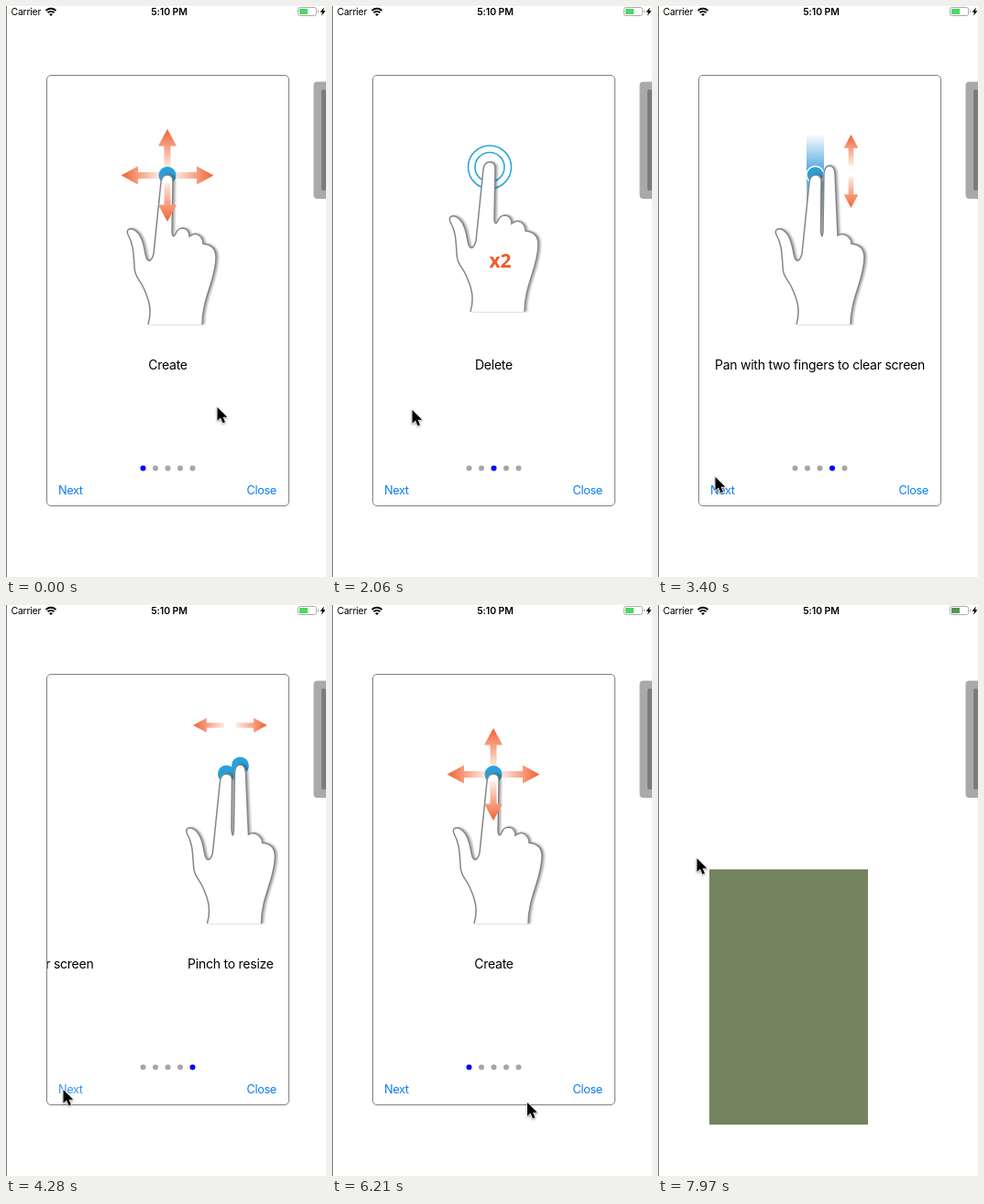
An HTML page that plays this animation: 349 px wide and 622 px high, repeating every 8 s.

```html
<!DOCTYPE html>
<html>
<head>
<meta charset="utf-8">
<style>
  html, body { margin: 0; height: 100%; overflow: hidden; background: #fff; }
  svg { display: block; font-family: Inter, sans-serif; }
  .hand { fill: #fff; stroke: #858585; stroke-width: 1.5; filter: drop-shadow(2px 0 1px #0005); }
  .ring { fill: none; stroke: #2ba8d8; stroke-width: 1.6; }
  .label { font-size: 14px; letter-spacing: -.24px; text-anchor: middle; }
  .count { font: bold 21px "Open Sans", sans-serif; fill: #f15a2c; text-anchor: middle; }
  .button { font-size: 12.8px; letter-spacing: -.4px; fill: #0a7cf5; }
  .status { font-size: 10.5px; }
</style>
</head>
<body>
<svg id="stage" width="349" height="622" viewBox="0 0 349 622"></svg>
<script>
const CARD_WIDTH = 264, STEP = 147.6, LOOP = 8000;

const wrist = 'M155 347C160 330 155 318 150 307C146 298 140 295 140 283C139 265 138 258 133 249' +
  'C131 244 134 242 138 243C147 246 150 258 152 270C154 280 158 280 161 270L169 192Q170 184 176 184Q182 184 182 191';
const knuckles = 'Q215 255 215 259Q229 260 229 274C229 298 214 318 214 347';
const oneFinger = wrist + 'L181 247Q182 254 185 248Q187 242 193 242Q200 243 200 251Q207 245 213 252' + knuckles;
const twoFingers = wrist + 'L181.5 245Q183 257 184 245L185 182Q186 174 191 174Q196 174 197 182L200 250Q207 246 213 253' + knuckles;

const hand = (d, x, y) => `<path class="hand" d="${d}" transform="translate(${x} ${y})"/>`;
const arrow = (x, y, angle, scale = 1) =>
  `<path fill="url(#flame)" d="M0-50.5L10-32H3.5V-8H-3.5V-32H-10Z" transform="translate(${x} ${y}) rotate(${angle}) scale(${scale})"/>`;
const ring = r => `<circle class="ring" cx="172" cy="175.500" r="${r}"/>`;
const spot = (x, y, stroke = 'none') => `<circle cx="${x}" cy="${y}" r="9.5" fill="#29a0dc" stroke="${stroke}" stroke-width="1.5"/>`;
const count = s => `<text class="count" x="183.500" y="284.500">${s}</text>`;

const pages = [
  ['Create', [0, 90, 270].map(a => arrow(176, 184.5, a)).join('') + spot(176, 184.5) +
    hand(oneFinger, 0, 0) + arrow(176, 184.5, 180)],
  ['Bring to front', ring(16) + hand(oneFinger, -4, -14) + count('x1')],
  ['Delete', ring(16) + ring(23.5) + hand(oneFinger, -4, -14) + count('x2')],
  ['Pan with two fingers to clear screen',
    '<rect x="162" y="139" width="19" height="101" fill="url(#trail)"/>' + spot(171.5, 184, '#fff') +
    arrow(210.5, 180, 0, .79) + arrow(210.5, 180, 180, .79) + hand(twoFingers, -4, 0)],
  ['Pinch to resize', arrow(176, 131, 90, .8) + arrow(176, 131, 270, .8) +
    spot(172, 184) + spot(187, 175) + hand(twoFingers, -4, 0)],
];

const slides = pages.map(([label, art], i) =>
  `<g transform="translate(${i * CARD_WIDTH})">${art}<text class="label" x="176.500" y="396">${label}</text></g>`).join('');
const dots = pages.map((_, i) => `<circle class="dot" cx="${149.5 + i * 13.5}" cy="503.500" r="3"/>`).join('');

stage.innerHTML = `
  <defs>
    <linearGradient id="flame" gradientUnits="userSpaceOnUse" x1="0" y1="-6" x2="0" y2="-46">
      <stop stop-color="#fff3ec"/><stop offset="1" stop-color="#f26f43"/>
    </linearGradient>
    <linearGradient id="trail" x2="0" y2="1">
      <stop stop-color="#fff"/><stop offset=".42" stop-color="#4ba3dd"/><stop offset="1" stop-color="#fff"/>
    </linearGradient>
    <clipPath id="window"><rect x="45" y="76" width="264" height="468"/></clipPath>
  </defs>
  <rect width="349" height="622" fill="#fff"/>
  <rect id="box" fill="#74845f"/>
  <path d="M.5 0V622" stroke="#777"/>
  <rect x="335.500" y="82.500" width="30" height="127.500" rx="4" fill="#a9a9a9"/>
  <rect x="344" y="91" width="5" height="110" rx="2" fill="#7b7b7b"/>
  <g class="status">
    <text x="5.500" y="10.300" letter-spacing="-.25">Carrier</text>
    <text x="178" y="10.300" text-anchor="middle" font-weight="600" letter-spacing="-.1">5:10 PM</text>
  </g>
  <path d="M43.500 5Q49 .5 54.500 5M45.500 7.300Q49 4.500 52.500 7.300" fill="none" stroke="#000" stroke-width="1.800"/>
  <path d="M47 8.900Q49 7.500 51 8.900L49 11Z"/>
  <rect x="318.500" y="1.500" width="20" height="9" rx="2" fill="#fff" stroke="#aaa"/>
  <rect id="charge" x="320" y="3" width="9" height="6"/>
  <path d="M340.500 4.500V7.500" stroke="#aaa"/>
  <path d="M347 1.500L342.500 6.800H345L344 10.800L348.500 5.300H346Z"/>
  <g id="card">
    <g clip-path="url(#window)"><g id="strip">${slides}</g></g>
    ${dots}
    <text id="next" class="button" x="57" y="532">Next</text>
    <text id="close" class="button" x="262.500" y="532">Close</text>
    <rect x="44.500" y="75.500" width="264" height="469" rx="4.500" fill="none" stroke="#808080"/>
  </g>
  <path id="cursor" d="M.5 0V14.800L4 11.600L6.500 17.300L9 16.200L6.600 10.700H11.300Z" stroke="#fff" stroke-width="1.200"
    paint-order="stroke" style="filter:drop-shadow(0 1px 1px #0006)"/>`;

// Tracks hold [step, value, ...] keys, eased between neighbours.
const cursorTrack = [[2, 230, 437], [6, 95, 437], [10, 226, 440], [14, 87, 440], [17, 218, 442], [21, 85, 445],
  [23, 62, 513], [25, 62, 528], [39, 62, 528], [41, 150, 551], [43, 275, 533], [46, 275, 533],
  [49, 233, 575], [50, 233, 575], [54, 42, 276]];
const pageTrack = [[2, 0], [6, .989], [7, 1], [10, 1], [14, 2], [17, 2], [21, 3], [27, 3], [30, 4],
  [34, 4], [35, 3.1], [36, .22], [37, .02], [38, 0]];
const nextTrack = [[25, 1], [26, .25], [27, .25], [30, 1], [33, 1], [34, .25], [35, .25], [36, .6], [38, 1]];

function sample(track, step) {
  const i = track.findIndex(key => key[0] > step);
  if (i < 1) return (i ? track.at(-1) : track[0]).slice(1);
  const a = track[i - 1], b = track[i], u = (step - a[0]) / (b[0] - a[0]);
  const ease = u * u * (3 - 2 * u);
  return a.slice(1).map((v, j) => v + (b[j + 1] - v) * ease);
}

const set = (el, attrs) => Object.entries(attrs).forEach(([name, value]) => el.setAttribute(name, value));
const get = id => document.getElementById(id);
const [box, charge, card, strip, next, closeButton, cursor] =
  ['box', 'charge', 'card', 'strip', 'next', 'close', 'cursor'].map(get);
const dotList = document.querySelectorAll('.dot');

function draw(time) {
  const step = Math.floor((time % LOOP + 8) / STEP);
  const [x, y] = sample(cursorTrack, step), [page] = sample(pageTrack, step);
  const drawing = step > 50;
  set(cursor, { transform: `translate(${x} ${y})` });
  set(strip, { transform: `translate(${-page * CARD_WIDTH})` });
  dotList.forEach((dot, i) => set(dot, { fill: i === Math.round(page) ? '#00f' : '#a5a5a5' }));
  set(next, { opacity: sample(nextTrack, step) });
  set(closeButton, { opacity: step === 44 ? .25 : 1 });
  set(card, { visibility: step < 45 ? 'visible' : 'hidden' });
  const left = Math.min(229, x + 14), top = Math.min(566, y + 12);
  set(box, { x: left, y: top, width: drawing ? 229 - left : 0, height: 566 - top });
  set(charge, { fill: drawing ? '#4f9a55' : '#4cd964' });
}

const start = performance.now();
function tick() {
  draw(performance.now() - start);
  requestAnimationFrame(tick);
}
tick();
</script>
</body>
</html>
```
